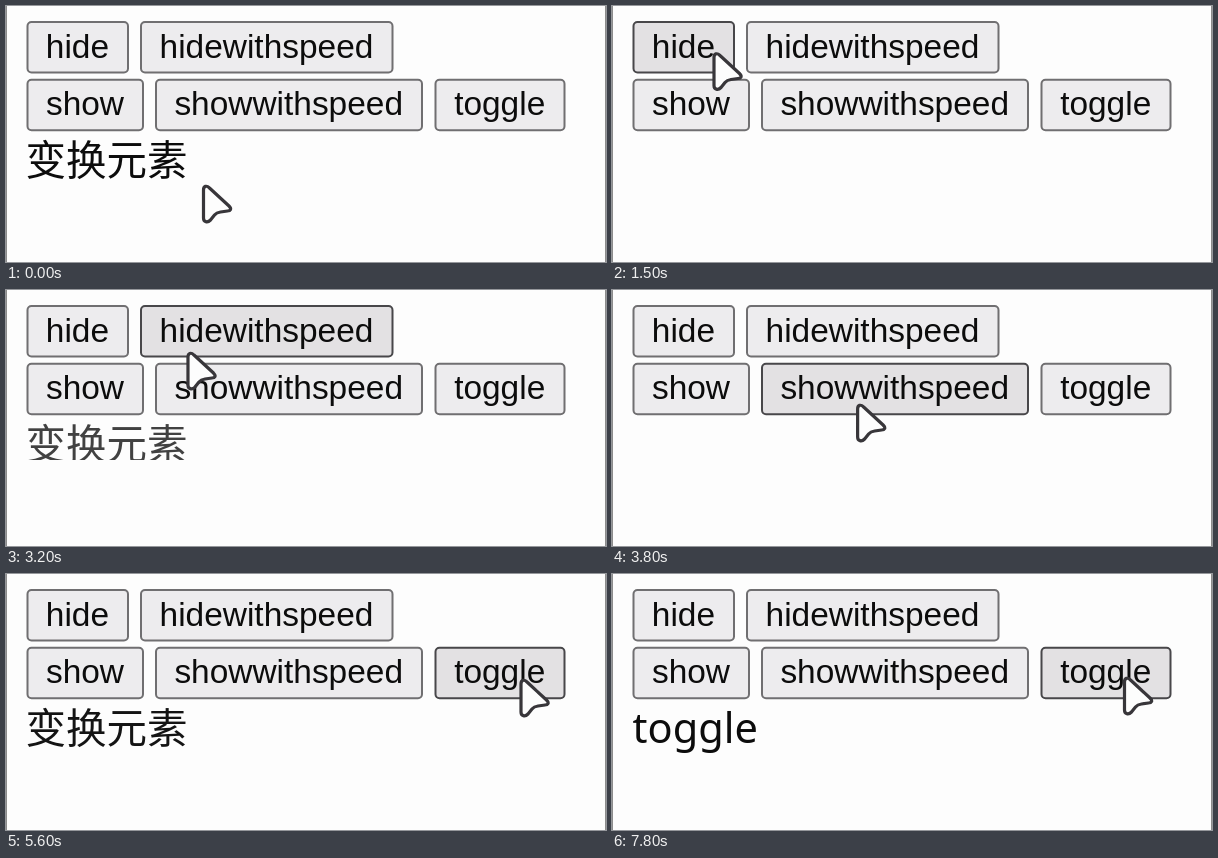
Recreate the animation shown at these times as an HTML page. Size 600 px wide and 256 px high, loop 7900 ms.

```html
<!DOCTYPE html>
<html lang="zh-CN">
<head>
<meta charset="utf-8">
<style>
  html, body { margin: 0; width: 100%; height: 100%; overflow: hidden; background: #fdfdfd; }
  svg { display: block; width: 600px; height: 256px; }
  .label { font: 33.45px "Liberation Sans", Arial, sans-serif; text-anchor: middle; fill: #0c0c0c; }
  .chinese { font: 40.5px "Noto Sans CJK SC", "Noto Sans CJK", "Noto Sans CJK JP", sans-serif; }
  .latin { font: 41.5px "Noto Sans", sans-serif; }
</style>
</head>
<body>
<svg viewBox="0 0 600 256">
  <defs>
    <clipPath id="reveal"><rect id="window" x="0" y="128" width="600" height="53"/></clipPath>
    <filter id="soft" filterUnits="userSpaceOnUse" x="0" y="0" width="600" height="256"
      color-interpolation-filters="sRGB"><feGaussianBlur stdDeviation=".5"/></filter>
  </defs>
  <rect width="600" height="256" fill="#fdfdfd"/>
  <path d="M.5 0V256M599.5 0V256" stroke="#8c8c8c"/>
  <g filter="url(#soft)">
    <g id="buttons"></g>
    <g id="element" clip-path="url(#reveal)" fill="#0c0c0c">
      <text id="chinese" class="chinese" x="19.6" y="168.5">变换元素</text>
      <text id="latin" class="latin" x="20.6" y="168.5">toggle</text>
    </g>
    <path id="cursor" fill="#fdfdfd" stroke="#38363a" stroke-width="3.2" stroke-linejoin="round"
      d="M0 4C0 0 3-1 6 2L25.5 20C28.5 23 27 25 24 25L17 26Q13 26.5 11 29L7 34C4 37 0 36 0 32Z"/>
  </g>
</svg>
<script>
const LOOP = 7900, STEP = 100, SPEED = 1000;
const LINE_TOP = 128.2, LINE_HEIGHT = 52.5;
const byId = id => document.getElementById(id);

function svg(tag, attrs, parent) {
  const node = document.createElementNS('http://www.w3.org/2000/svg', tag);
  for (const key in attrs) node.setAttribute(key, attrs[key]);
  return parent.appendChild(node);
}

// label, left, right, top
const buttons = [
  ['hide', 20.5, 123, 15],
  ['hidewithspeed', 134, 387.5, 15],
  ['show', 20.5, 138, 72.7],
  ['showwithspeed', 149, 417, 72.7],
  ['toggle', 428.5, 559.5, 72.7]
].map(([label, left, right, top]) => {
  const bottom = top + 52.5;
  const box = svg('rect', {
    x: left + 1, y: top + 1, width: right - left - 2, height: bottom - top - 2,
    rx: 4, 'stroke-width': 2
  }, byId('buttons'));
  svg('text', { class: 'label', x: (left + right) / 2 - 0.3, y: top + 36.6 }, byId('buttons')).textContent = label;
  return { box, left, right, top, bottom };
});

// time, x, y of the pointer tip
const pointer = [
  [0, 197.5, 180], [100, 197.5, 180], [800, 104, 50], [1500, 102, 47.5],
  [1600, 102, 49], [1900, 98, 104], [2150, 98, 104], [2500, 180, 65],
  [3250, 182, 63], [3700, 245.5, 115], [4400, 248, 115], [4900, 515.5, 126],
  [5300, 515, 106], [6400, 515, 106], [6900, 514, 107], [7800, 512.5, 104]
];

const swing = p => 0.5 - Math.cos(Math.PI * Math.min(1, Math.max(0, p))) / 2;

function pointerAt(t) {
  const next = pointer.findIndex(key => key[0] > t);
  if (next < 0) return pointer[pointer.length - 1].slice(1);
  const [t0, x0, y0] = pointer[next - 1], [t1, x1, y1] = pointer[next];
  const p = swing((t - t0) / (t1 - t0));
  return [x0 + (x1 - x0) * p, y0 + (y1 - y0) * p];
}

function visibility(t) {
  const progress = start => swing((t - start) / SPEED);
  if (t < 1100) return 1;
  if (t < 2000) return 0;
  if (t < 4000) return 1 - progress(2890);
  if (t < 5480) return progress(4345);
  if (t < 6600) return 1 - progress(5480);
  return progress(6742);
}

function render(t) {
  const [x, y] = pointerAt(t), shown = visibility(t);
  byId('cursor').setAttribute('transform', `translate(${x} ${y})`);
  for (const { box, left, right, top, bottom } of buttons) {
    const hover = x > left && x < right && y > top && y < bottom;
    box.setAttribute('fill', hover ? '#e3e1e3' : '#edecee');
    box.setAttribute('stroke', hover ? '#48474a' : '#706f71');
  }
  byId('window').setAttribute('y', LINE_TOP);
  byId('window').setAttribute('height', LINE_HEIGHT * shown);
  byId('element').setAttribute('opacity', shown);
  const toggled = t > 6480;
  byId('chinese').setAttribute('display', toggled ? 'none' : 'inline');
  byId('latin').setAttribute('display', toggled ? 'inline' : 'none');
}

const begin = performance.now();
function frame() {
  const elapsed = (performance.now() - begin) % LOOP;
  render(Math.floor(elapsed / STEP) * STEP);
  requestAnimationFrame(frame);
}
frame();
</script>
</body>
</html>
```
